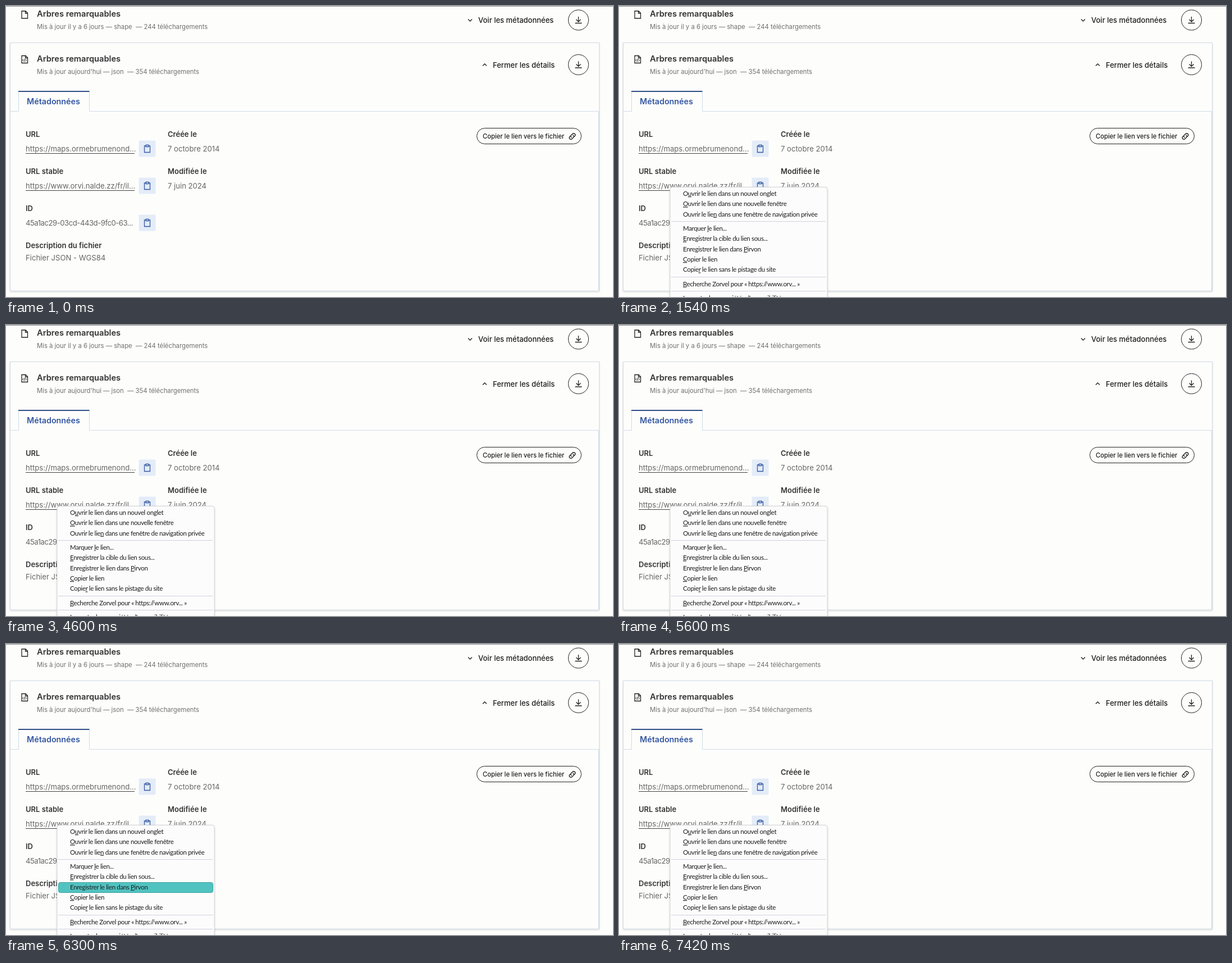
An HTML page that plays this animation: 1081x518 px, repeating every 8 s.

```html
<!DOCTYPE html>
<html lang="fr">
<head>
<meta charset="utf-8">
<title>Copier un lien stable</title>
<style>
  html, body { margin: 0; width: 100%; height: 100%; overflow: hidden; background: #fdfdfb; }
  svg { display: block; }
  text { font-family: Inter, sans-serif; font-size: 13px; fill: #666; white-space: pre; }
  .title { font-size: 14.65px; font-weight: 600; fill: #333; }
  .small { font-size: 11.3px; fill: #707070; }
  .label { font-weight: 600; fill: #333; }
  .value { font-size: 13.1px; }
  .code { letter-spacing: -.45px; }
  .action { font-weight: 500; fill: #1e1e1e; }
  .tab { font-size: 14.3px; font-weight: 600; fill: #3558a2; }
  .pill { font-size: 11.2px; font-weight: 500; fill: #1e1e1e; }
  .item { font-family: Lato, sans-serif; font-size: 11.5px; letter-spacing: -.35px; fill: #1c1c1c; }
  .key { text-decoration: underline; }
  .line { fill: none; stroke: #222; stroke-width: 1.3; }
  .thin { stroke-width: 1; }
  .blue { fill: none; stroke: #3558a2; stroke-width: 1.3; }
  .border { fill: none; stroke: #d0dce6; }
</style>
</head>
<body>
<svg width="1081" height="518" viewBox="0 0 1081 518">
  <defs>
    <g id="download">
      <circle r="18" class="line thin"/>
      <path class="line" d="M0 -6V3M-4 -1L0 3L4 -1M-6 5.5H6"/>
    </g>
    <path id="sheet" class="line" d="M-5 -6.5H2L5.5 -3V6.5H-5ZM1.5 -6.5V-2.5H5.5"/>
    <g id="clipboard">
      <rect x="-15" y="-14.5" width="30" height="29" rx="2" fill="#e3ecf7"/>
      <path class="blue" d="M-3 -5H-5V6.5H5V-5H3M-2.5 -6.5H2.5V-3.5H-2.5Z"/>
    </g>
    <filter id="shadow" x="-5%" y="-5%" width="110%" height="110%">
      <feDropShadow dx="0" dy="1" stdDeviation="1.5" flood-color="#000" flood-opacity=".22"/>
    </filter>
  </defs>

  <rect width="1081" height="518" fill="#fdfdfb"/>
  <path d="M0 .5H1081" stroke="#8b8b8b"/>
  <rect x="7.5" y="65.5" width="1049" height="442" fill="#fdfdfc" filter="url(#shadow)"/>
  <rect class="border" x="7.5" y="65.5" width="1049" height="441.5"/>
  <path class="border" d="M7 187.5H22.5V152M148.5 152V187.5H1055.5V507"/>
  <path d="M22 152H148.5" stroke="#2f4f86" stroke-width="2"/>

  <use href="#sheet" x="33" y="15.5"/>
  <use href="#sheet" x="33" y="95"/>
  <path class="line thin" d="M31.5 94.5L29.5 96.5L31.5 98.5M34.5 94.5L36.5 96.5L34.5 98.5M33.5 94L32.5 99"/>
  <path class="line" d="M823 23.5L826.5 27L830 23.5M849 106.5L852.5 103L856 106.5"/>
  <use href="#download" x="1019.5" y="25"/>
  <use href="#download" x="1019.5" y="104.5"/>

  <rect x="838.5" y="217.5" width="186" height="28" rx="14" class="line thin"/>
  <g class="line" transform="translate(1008.5 232) rotate(-45)">
    <path d="M-1.5 -2.8H-3.5A2.8 2.8 0 0 0 -3.5 2.8H0A2.8 2.8 0 0 0 2.3 -1M1.5 2.8H3.5A2.8 2.8 0 0 0 3.5 -2.8H0A2.8 2.8 0 0 0 -2.3 1"/>
  </g>

  <g id="page"></g>
  <path d="M35 262.5H229M35 328.5H229" stroke="#444"/>
  <use href="#clipboard" x="251.5" y="254"/>
  <use href="#clipboard" x="251.5" y="320"/>
  <use href="#clipboard" x="251.5" y="386"/>

  <g id="menu" visibility="hidden">
    <rect x="91" y="322.5" width="280" height="220" rx="4" fill="#fcfcfc" stroke="#d5d5d8" filter="url(#shadow)"/>
    <path d="M93 383.5H368M93 482.5H368M93 507.5H368" stroke="#cfcfe0"/>
    <rect id="highlight" x="93.5" width="275" height="18" rx="3" fill="#50c3c1" stroke="#3f9f9f"/>
    <g id="items"></g>
  </g>
</svg>

<script>
const LOOP = 8000, MENU_OPENS = 1540;
const byId = id => document.getElementById(id);

function addText(parent, kind, x, y, content) {
  const node = document.createElementNS("http://www.w3.org/2000/svg", "text");
  node.setAttribute("class", kind);
  node.setAttribute("x", x);
  node.setAttribute("y", y);
  // An underscore precedes each access key.
  const [before, after] = content.split("_");
  node.append(before);
  if (after) {
    const key = document.createElementNS(node.namespaceURI, "tspan");
    key.setAttribute("class", "key");
    key.textContent = after[0];
    node.append(key, after.slice(1));
  }
  parent.append(node);
}

[
  ["title", 55, 19, "Arbres remarquables"],
  ["small", 55, 41, "Mis à jour il y a 6 jours — shape  — 244 téléchargements"],
  ["action", 841, 30, "Voir les métadonnées"],
  ["title", 55, 98.5, "Arbres remarquables"],
  ["small", 55, 120.5, "Mis à jour aujourd'hui — json  — 354 téléchargements"],
  ["action", 867, 109.5, "Fermer les détails"],
  ["tab", 37, 174.5, "Métadonnées"],
  ["label", 35, 233, "URL"],
  ["value", 35, 258.5, "https://maps.ormebrumenond..."],
  ["label", 35, 299, "URL stable"],
  ["value", 35, 324.5, "https://www.orvi.nalde.zz/fr/il..."],
  ["label", 35, 365, "ID"],
  ["value code", 35, 391, "45a1ac29-03cd-443d-9fc0-63..."],
  ["label", 35, 431, "Description du fichier"],
  ["value", 35, 453, "Fichier JSON - WGS84"],
  ["label", 288, 233, "Créée le"],
  ["value", 288, 258.5, "7 octobre 2014"],
  ["label", 288, 299, "Modifiée le"],
  ["value", 288, 324.5, "7 juin 2024"],
  ["pill", 849, 235.5, "Copier le lien vers le fichier"]
].forEach(row => addText(byId("page"), ...row));

const items = [
  "O_uvrir le lien dans un nouvel onglet",
  "_Ouvrir le lien dans une nouvelle fenêtre",
  "Ouvrir le lie_n dans une fenêtre de navigation privée",
  "Marquer _le lien...",
  "_Enregistrer la cible du lien sous...",
  "Enregistrer le lien dans _Pirvon",
  "_Copier le lien",
  "Copie_r le lien sans le pistage du site",
  "_Recherche Zorvel pour « https://www.orv... »",
  "_Inspecter les propriétés d'accessibilité"
];
// Three separators each add a gap between groups.
const baseline = i => 338 + 18.35 * i + 6.9 * ((i > 2) + (i > 7) + (i > 8));
items.forEach((label, i) => addText(byId("items"), "item", 114, baseline(i), label));

// Start time and index of the hovered item; -1 means none.
const hovers = [[0, -1], [5720, 0], [5860, 1], [5940, 2], [6020, 3],
  [6140, 4], [6300, 5], [6580, 6], [7300, -1]];

function draw() {
  const t = performance.now() % LOOP;
  const hovered = hovers.filter(([start]) => start <= t).pop()[1];
  const open = t >= MENU_OPENS;
  byId("menu").setAttribute("visibility", open ? "visible" : "hidden");
  byId("highlight").setAttribute("visibility", open && hovered >= 0 ? "visible" : "hidden");
  byId("highlight").setAttribute("y", Math.round(baseline(Math.max(hovered, 0))) - 12.5);
  requestAnimationFrame(draw);
}
draw();
</script>
</body>
</html>
```
